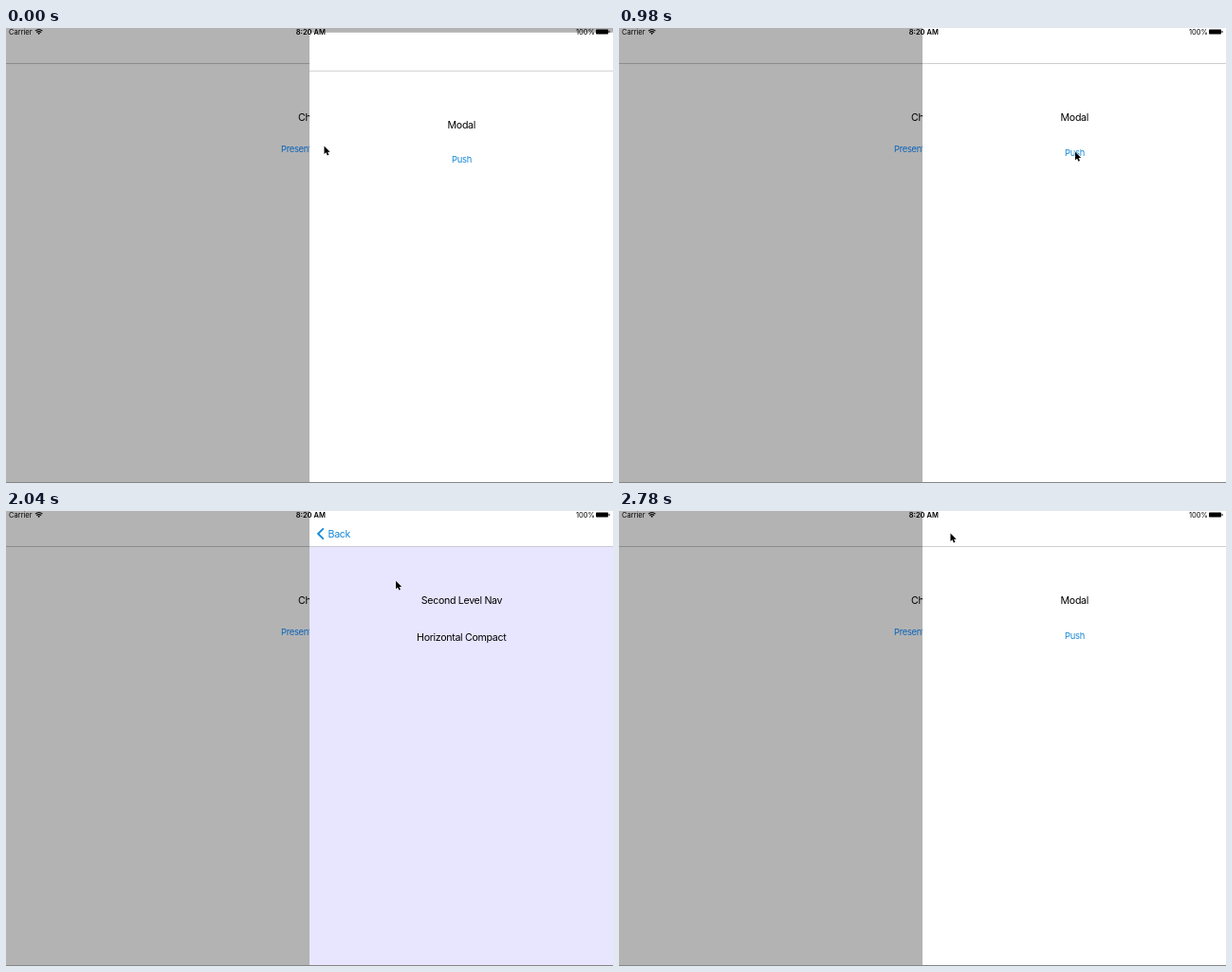
Write an HTML page that moves like this. It is 640x480 px and loops after 2800 ms.

```html
<!DOCTYPE html>
<html lang="en">
<head>
<meta charset="utf-8">
<title>Modal navigation</title>
<style>
  html, body { margin: 0; width: 100%; height: 100%; overflow: hidden; background: #b3b3b3; }
  svg { display: block; width: 640px; height: 480px; }
  text { font: 10.6px Inter, "Liberation Sans", sans-serif; letter-spacing: -.3px; fill: #000; }
  .mid { text-anchor: middle; }
  .link { font-size: 9.4px; fill: #1287d6; }
  .status text { font-size: 7.5px; letter-spacing: 0; }
</style>
</head>
<body>
<svg viewBox="0 0 640 480">
  <defs>
    <linearGradient id="edge">
      <stop offset="0" stop-color="#000" stop-opacity="0"/>
      <stop offset="1" stop-color="#000" stop-opacity=".1"/>
    </linearGradient>
  </defs>

  <rect width="640" height="480" fill="#b3b3b3"/>
  <rect y="37" width="640" height="1" fill="#8c8c8c"/>
  <text class="mid" x="320" y="98">Child</text>
  <text class="mid link" x="320" y="131" style="fill:#0a63b8">Present Modal</text>

  <g id="modal">
    <rect x="320" y="-3" width="320" height="484" fill="#fff"/>
    <g id="first">
      <text class="mid" x="480.3" y="98">Modal</text>
      <text id="push" class="mid link" x="480.5" y="134.5">Push</text>
    </g>
    <rect id="dim" x="320" y="38" width="320" height="442"/>
    <rect x="320" y="37" width="320" height="1" fill="#cfcfcf"/>
  </g>

  <g id="top">
    <g id="second">
      <rect id="shade" x="315" y="38" width="5" height="442" fill="url(#edge)"/>
      <rect x="320" y="38" width="320" height="442" fill="#e8e5ff"/>
      <text class="mid" x="480.5" y="98">Second Level Nav</text>
      <text id="size" class="mid" x="480.2" y="136.7">Horizontal Compact</text>
    </g>
    <rect x="320" width="320" height="37" fill="#fff"/>
    <rect x="320" y="37" width="320" height="1" fill="#cbcad2"/>
    <path id="chevron" d="M334.8 18.3L329 24L334.8 29.7" fill="none" stroke="#1287d6" stroke-width="1.8"/>
    <text id="back" x="339.5" y="27.8" style="fill:#1287d6">Back</text>
  </g>

  <rect y="479" width="640" height="1" fill="#858585"/>

  <g class="status">
    <text x="3" y="6.8">Carrier</text>
    <g fill="none" stroke="#000" stroke-width="1.1">
      <path d="M31 3.2Q34.7 -.2 38.4 3.2M32.3 4.7Q34.7 2.5 37.1 4.7"/>
    </g>
    <path d="M33.4 5.6Q34.7 4.5 36 5.6L34.7 7Z"/>
    <text class="mid" x="321.3" y="6.8" font-weight="600" style="font-weight:600">8:20 AM</text>
    <text x="601" y="6.8">100%</text>
    <rect x="622" y="1.4" width="13" height="5.2" rx=".8"/>
    <rect x="635.6" y="3" width=".9" height="2"/>
  </g>

  <path id="cursor" d="M0 0V8.6L2 6.8L3.4 9.9L4.9 9.2L3.6 6.2H6.2Z" stroke="#fff" stroke-width=".9" paint-order="stroke"/>
</svg>
<script>
  const LOOP = 2800, WIDTH = 320;
  const PUSH = 1020, PUSHED = 1300, POP = 2565, POPPED = 2708;
  const part = {};
  for (const el of document.querySelectorAll("svg [id]")) part[el.id] = el;

  const span = (t, a, b) => Math.min(1, Math.max(0, (t - a) / (b - a)));
  const ease = p => .5 - .5 * Math.cos(Math.PI * p);
  const mix = (a, b, p) => a + (b - a) * p;
  const move = (el, x, y = 0) => el.setAttribute("transform", `translate(${x.toFixed(2)} ${y.toFixed(2)})`);
  const fade = (el, a) => el.setAttribute("opacity", a.toFixed(3));

  // Critically damped spring, settled once the push is over
  function spring(t) {
    if (t <= PUSH) return 0;
    if (t >= PUSHED) return 1;
    const s = (t - PUSH) * .0268;
    return 1 - (1 + s) * Math.exp(-s);
  }

  function draw(t) {
    move(part.modal, 0, t < 200 ? 8 * Math.exp(-t / 40) : 0);

    const popping = t >= POP;
    const p = popping ? 0 : spring(t);
    move(part.first, -.3 * WIDTH * p);
    part.dim.setAttribute("fill-opacity", .09 * p);
    fade(part.push, popping ? 1 : 1 - .4 * span(t, 980, PUSH));

    part.top.style.display = t > PUSH && t < POPPED ? "" : "none";
    move(part.top, -2 * WIDTH * ease(span(t, POP, POPPED)));
    const q = popping ? 1 : p;
    move(part.second, WIDTH * (1 - q));
    fade(part.shade, q < 1 ? 1 : 0);
    part.size.style.display = t >= PUSHED ? "" : "none";

    const press = popping ? 0 : span(t, 2490, 2540);
    move(part.back, 134 * (1 - q));
    fade(part.back, q * (1 - .87 * press));
    fade(part.chevron, span(q, .7, 1) * (1 - .75 * press));

    const a = ease(span(t, 80, 520)), b = ease(span(t, 1760, 2300));
    move(part.cursor, mix(mix(335.5, 481, a), 349.5, b), mix(mix(124.5, 130.8, a), 23.5, b));
  }

  const start = performance.now();
  function tick() {
    draw((performance.now() - start) % LOOP);
    requestAnimationFrame(tick);
  }
  draw(0);
  requestAnimationFrame(tick);
</script>
</body>
</html>
```
